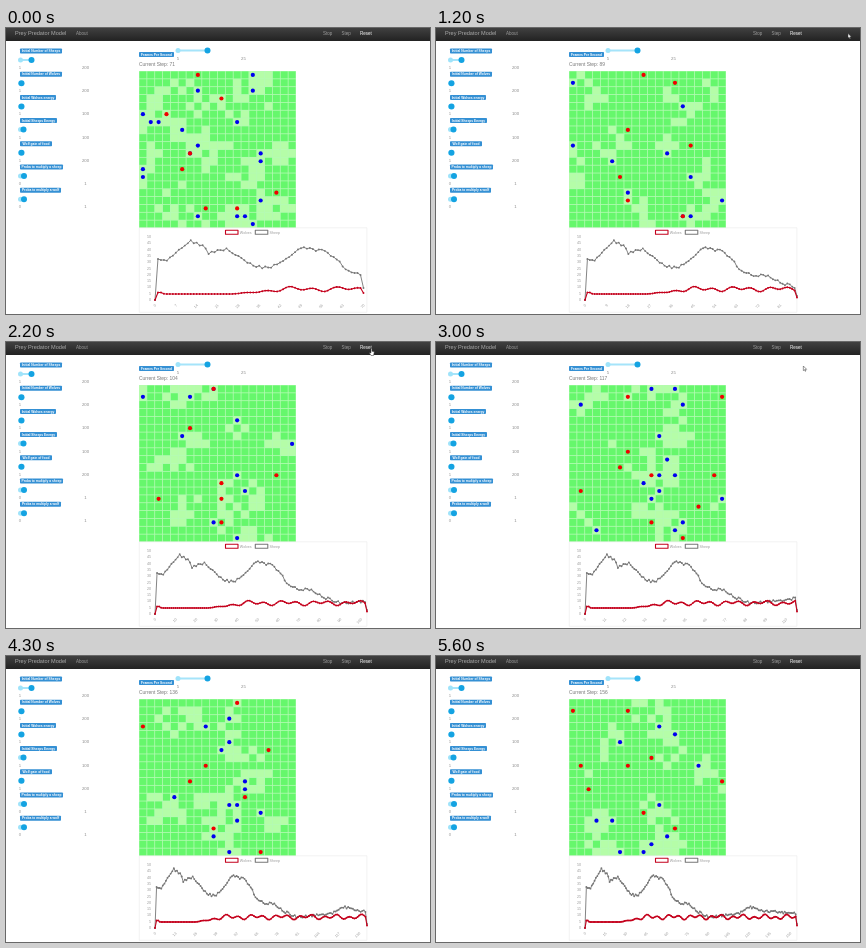
An HTML page with a canvas that plays this animation: 424 px wide and 286 px high, repeating every 5.7 s.

```html
<!DOCTYPE html>
<html lang="en">
<head>
<meta charset="utf-8">
<title>Prey Predator Model</title>
<style>
html, body { margin: 0; width: 100%; height: 100%; overflow: hidden; background: #fff; }
canvas { display: block; width: 424px; height: 286px; }
</style>
</head>
<body>
<canvas id="stage"></canvas>
<script>
const W = 424, H = 286, FRAME = 100, FRAMES = 57;
const FONT = '"Liberation Sans", Arial, sans-serif';
const FIRST_STEP = 71, STEPS_PER_FRAME = 1.52, LAST_STEP = 157;
const GRID = 20, REGROW = 12, HERD_X = 11;
const BASE_Y = 272, UNIT = 1.26;

const canvas = document.getElementById('stage');
const ctx = canvas.getContext('2d');
const dpr = window.devicePixelRatio || 1;
canvas.width = W * dpr;
canvas.height = H * dpr;

const lerp = (a, b, u) => a + (b - a) * u;
const clamp = (v, lo, hi) => Math.max(lo, Math.min(hi, v));
const smooth = u => { u = clamp(u, 0, 1); return u * u * (3 - 2 * u); };
const noise = n => {
  const s = Math.sin(n * 127.1 + 311.7) * 43758.5453;
  return s - Math.floor(s);
};
function randomFrom(seed) {
  return () => (seed = (seed * 16807) % 2147483647) / 2147483647;
}
function sample(points, x, col = 1) {
  let i = 1;
  while (i < points.length - 1 && points[i][0] < x) i++;
  const a = points[i - 1], b = points[i];
  return lerp(a[col], b[col], clamp((x - a[0]) / (b[0] - a[0]), 0, 1));
}

// Sheep population: turning points as step, height on the stage
const sheepTurns = [
  [0, 272], [1, 231], [4, 232], [8, 221], [12, 213], [16, 218], [18, 225], [24, 221],
  [29, 231], [33, 238], [38, 240], [42, 235], [49, 220], [57, 223], [61, 231], [64, 241],
  [69, 247], [76, 248], [83, 256], [90, 261], [112, 258], [120, 251], [132, 255], [156, 258]
];
const sheepY = s => sample(sheepTurns, s) + (s > 1 ? noise(s) * 2.4 - 1.2 : 0);
const wolfY = s => {
  if (s === 0) return BASE_Y;
  const grown = smooth((s - 24) / 22);
  return 266 - 5 * grown + grown * (1.5 * Math.sin(s * .8) + 1.2 * Math.sin(s * .37))
    - 2 * Math.exp(-((s - 1.5) ** 2));
};
const count = y => Math.round((BASE_Y - y) / UNIT);

// Sheep wander and graze, wolves wander, grass grows back
function simulate() {
  const rnd = randomFrom(4711);
  const pick = n => Math.floor(rnd() * n);
  const eatenAt = new Array(GRID * GRID).fill(-REGROW);
  const sheep = [], wolves = [], states = [];
  const wander = (p, pull) => {
    const dx = rnd() < pull ? Math.sign(HERD_X - p.x) : pick(3) - 1;
    p.x = clamp(p.x + dx, 0, GRID - 1);
    p.y = clamp(p.y + pick(3) - 1, 0, GRID - 1);
  };
  const resize = (group, n) => {
    while (group.length > n) group.splice(pick(group.length), 1);
    while (group.length < n) group.push({ x: pick(GRID), y: pick(GRID) });
  };
  for (let s = 1; s <= LAST_STEP; s++) {
    resize(sheep, count(sheepY(s)));
    resize(wolves, count(wolfY(s)));
    const pull = .2 * smooth((s - 75) / 25);
    sheep.forEach(p => {
      wander(p, pull);
      const i = p.y * GRID + p.x;
      if (s - eatenAt[i] >= REGROW) eatenAt[i] = s;
    });
    wolves.forEach(p => wander(p, 0));
    const copy = group => group.map(p => ({ ...p }));
    states[s] = { sheep: copy(sheep), wolves: copy(wolves), bare: eatenAt.map(e => s - e < REGROW) };
  }
  return states;
}
const states = simulate();

const sliders = [
  ['Initial Number of Sheeps', 42, 25.5, '1', '200'],
  ['Initial Number of Wolves', 42, 15.5, '1', '200'],
  ['Initial Wolves energy', 36, 15.5, '1', '100'],
  ['Initial Sheeps Energy', 37, 17.5, '1', '100'],
  ['Wolf gain of food', 32, 15.5, '1', '200'],
  ['Proba to multiply a sheep', 43, 18, '0', '1'],
  ['Proba to multiply a wolf', 41, 18, '0', '1']
];

// Pointer: time, x, y
const cursorPath = [
  [1000, 412, 5.5], [1300, 412, 5.5], [1900, 365, 6.5], [2300, 365, 6.5],
  [2800, 367, 24], [3100, 367.5, 24], [3500, 388, 28], [3800, 416, 31]
];

function text(str, x, y, size, color, align = 'left', weight = '') {
  ctx.font = `${weight} ${size}px ${FONT}`;
  ctx.fillStyle = color;
  ctx.textAlign = align;
  ctx.fillText(str, x, y);
}
function disc(x, y, r, color) {
  ctx.fillStyle = color;
  ctx.beginPath();
  ctx.arc(x, y, r, 0, 7);
  ctx.fill();
}
function tag(str, x, y, w) {
  ctx.fillStyle = '#3490d4';
  ctx.beginPath();
  ctx.roundRect(x, y, w, 5, .8);
  ctx.fill();
  text(str, x + w / 2, y + 3.7, 3.3, '#fff', 'center', 'bold');
}
function slider(x, y, knob) {
  ctx.fillStyle = '#a5e4fa';
  ctx.fillRect(x, y - 1, knob - x, 2);
  disc(x, y, 2.5, '#9fe3fa');
  disc(knob, y, 3, '#14a3e2');
}

function drawPanel(step) {
  const bar = ctx.createLinearGradient(0, 0, 0, 13);
  bar.addColorStop(0, '#404040');
  bar.addColorStop(1, '#222');
  ctx.fillStyle = bar;
  ctx.fillRect(0, 0, W, 13);
  text('Prey Predator Model', 9, 7.2, 5.6, '#aaa');
  text('About', 70, 7, 4.5, '#9d9d9d');
  text('Stop', 317, 7, 4.5, '#9d9d9d');
  text('Step', 335.5, 7, 4.5, '#9d9d9d');
  text('Reset', 354, 7, 4.5, '#fff');

  sliders.forEach(([name, w, knob, lo, hi], i) => {
    const y = 20.5 + i * 23.2;
    tag(name, 14, y, w);
    slider(14.5, y + 11.5, knob);
    text(lo, 14, y + 20.5, 4.3, '#999', 'center');
    text(hi, 79.5, y + 20.5, 4.3, '#888', 'center');
  });

  tag('Frames Per Second', 133, 24, 35);
  slider(172, 22.5, 201.5);
  text('5', 172, 31.6, 4.3, '#888', 'center');
  text('25', 237.5, 31.6, 4.3, '#888', 'center');
  text('Current Step: ' + step, 133, 38.2, 4.9, '#777');
}

function drawField({ sheep, wolves, bare }) {
  const x0 = 133, y0 = 43, size = 157 / GRID;
  ctx.fillStyle = '#b4fab4';
  ctx.fillRect(x0, y0, 157, 157);
  bare.forEach((light, i) => {
    const x = i % GRID, y = Math.floor(i / GRID);
    ctx.fillStyle = light ? '#b5fda8' : '#66f76c';
    ctx.fillRect(x0 + x * size + .4, y0 + y * size + .4, size - .8, size - .8);
  });
  const dot = color => p => disc(x0 + (p.x + .5) * size, y0 + (p.y + .5) * size, 2.1, color);
  sheep.forEach(dot('#0000f0'));
  wolves.forEach(dot('#f00000'));
}

function plot(fn, n, dx, end, color, width) {
  const y = i => i === n ? end : fn(i);
  ctx.strokeStyle = color;
  ctx.lineWidth = width;
  ctx.lineJoin = 'round';
  ctx.beginPath();
  for (let i = 0; i <= n; i++) ctx.lineTo(149 + i * dx, y(i));
  ctx.stroke();
  for (let i = 0; i <= n; i++) disc(149 + i * dx, y(i), .95, color);
}

function legend(x, name, color) {
  ctx.strokeStyle = color;
  ctx.lineWidth = 1.1;
  ctx.strokeRect(x, 202.3, 12.5, 4);
  text(name, x + 14.3, 205.6, 3.6, '#999');
}

function drawChart(step) {
  ctx.strokeStyle = '#ededed';
  ctx.lineWidth = .7;
  ctx.strokeRect(133.3, 199.8, 227.6, 84.5);
  legend(219.5, 'Wolves', '#c4001c');
  legend(249.3, 'Sheep', '#777');
  for (let v = 0; v <= 50; v += 5) text(v, 145, BASE_Y + 1 - v * UNIT, 3.7, '#999', 'right');

  // A label under the last point needs room at the right
  const n = step - 1, every = Math.ceil(step / 11);
  const labelled = n % every === 0;
  const dx = ((labelled ? 357.5 : 361) - 149) / n;
  for (let i = 0; i <= n; i += every) {
    ctx.save();
    ctx.translate(150.5 + i * dx, 277.5);
    ctx.rotate(-.8);
    text(i, 0, 0, 3.7, '#999', 'right');
    ctx.restore();
  }
  plot(sheepY, n, dx, labelled ? 260 : 268, '#777', .9);
  plot(wolfY, n, dx, labelled ? 265 : 269.5, '#c4001c', 1.1);
}

function drawCursor(t) {
  if (t < cursorPath[0][0] || t > cursorPath.at(-1)[0]) return;
  const x = sample(cursorPath, t, 1), y = sample(cursorPath, t, 2);
  const hand = x > 353 && x < 367 && y < 12;
  const shape = hand
    ? [[0, 0], [1, 0], [1, 2.7], [3.3, 3.2], [2.6, 7], [0, 7], [-1.8, 4.2], [0, 4.4]]
    : [[0, 0], [0, 4.6], [1.1, 3.7], [1.8, 5.3], [2.6, 5], [1.9, 3.4], [3.3, 3.3]];
  ctx.beginPath();
  shape.forEach(([a, b]) => ctx.lineTo(x + a, y + b));
  ctx.closePath();
  ctx.fillStyle = '#fff';
  ctx.fill();
  ctx.strokeStyle = '#333';
  ctx.lineWidth = .5;
  ctx.stroke();
}

function draw(now) {
  const frame = Math.floor(Math.max(0, now) / FRAME) % FRAMES;
  const step = Math.round(FIRST_STEP + frame * STEPS_PER_FRAME);
  ctx.setTransform(dpr, 0, 0, dpr, 0, 0);
  ctx.fillStyle = '#fff';
  ctx.fillRect(0, 0, W, H);
  drawPanel(step);
  drawField(states[step]);
  drawChart(step);
  drawCursor(frame * FRAME);
}

const start = performance.now();
function tick() {
  draw(performance.now() - start);
  requestAnimationFrame(tick);
}
tick();
</script>
</body>
</html>
```
